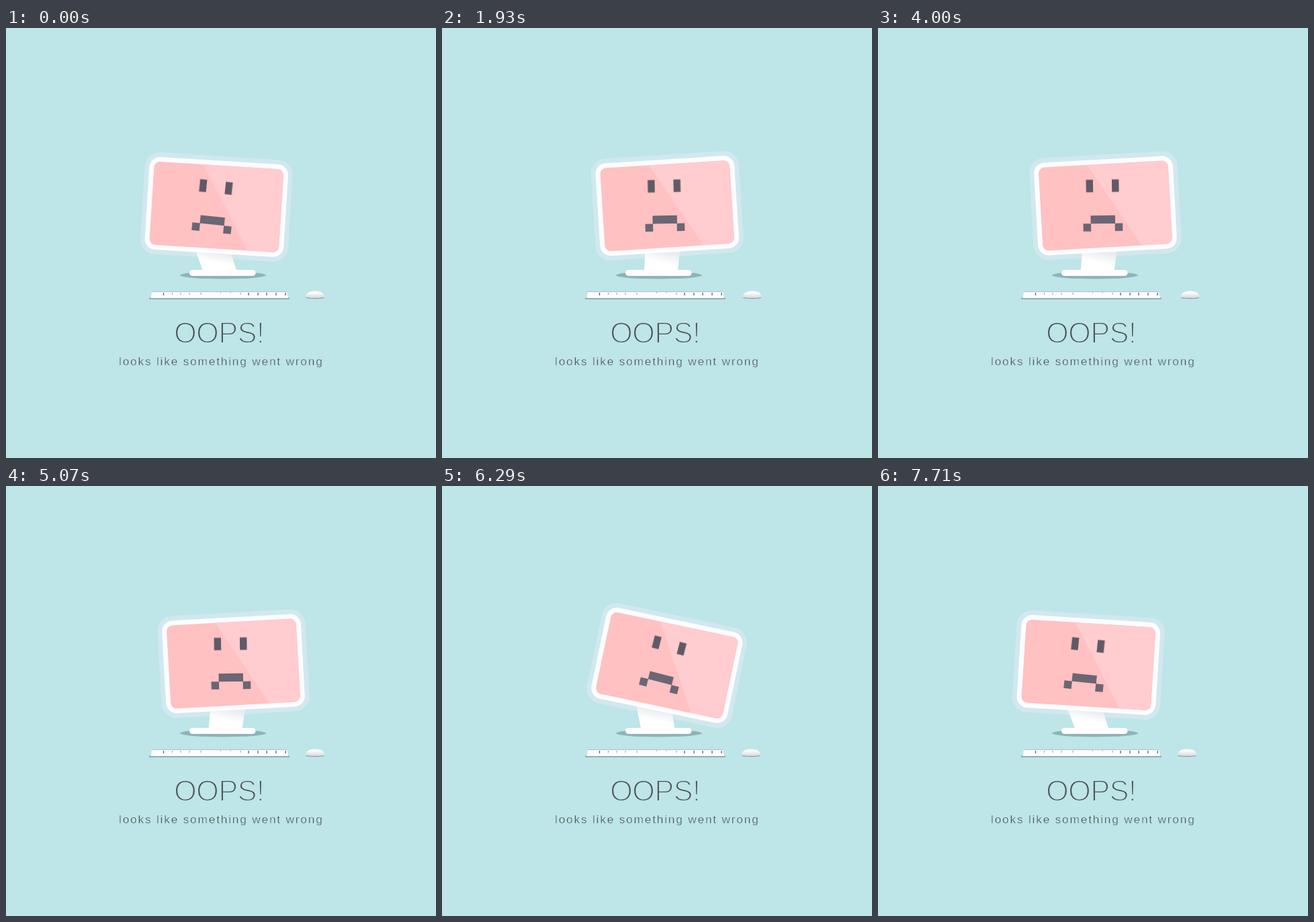
These frames come from a looping animation (640 px wide and 640 px high, 8070 ms). An HTML page:

```html
<!DOCTYPE html>
<html lang="en">
<head>
<meta charset="utf-8">
<title>Oops</title>
<style>
  /* --n: 0 = monitor on the left, 1 = on the right; --a: monitor tilt */
  @property --n { syntax: "<number>"; inherits: true; initial-value: 0; }
  @property --a { syntax: "<angle>"; inherits: true; initial-value: 3.6deg; }

  html, body { margin: 0; width: 100%; height: 100%; overflow: hidden; background: #bee5e7; }
  svg {
    display: block; width: 100vw; height: 100vh;
    animation: slide 8.07s infinite, tilt 8.07s infinite;
  }
  .head {
    transform: translate(calc(var(--n) * 33.1px), calc(var(--n) * -2px)) rotate(var(--a));
  }
  .neck {
    transform: translateX(calc(var(--n) * 8px)) skewX(calc(19.1deg - var(--n) * 25.7deg));
  }
  .mouse { animation: nudge 8.07s infinite; }
  .face { animation: face 8.07s step-end infinite; }
  .code { visibility: hidden; animation: code 8.07s step-end infinite; }
  .open { animation: open 8.07s step-end infinite; }
  .shut { opacity: 0; animation: shut 8.07s step-end infinite; }

  @keyframes slide {
    0%, 14.99% { --n: 0; animation-timing-function: ease-in; }
    19.58% { --n: .45; animation-timing-function: ease-out; }
    26.02%, 67.29% { --n: 1; animation-timing-function: ease-in; }
    74.35% { --n: .81; animation-timing-function: linear; }
    77.45% { --n: .45; animation-timing-function: ease-out; }
    81.41% { --n: -.02; animation-timing-function: ease-out; }
    87.98%, 100% { --n: 0; }
  }
  @keyframes tilt {
    0%, 14.99% { --a: 3.6deg; animation-timing-function: ease-in-out; }
    20.45% { --a: -8.1deg; animation-timing-function: ease-in-out; }
    23.92% { --a: -3.65deg; animation-timing-function: ease-out; }
    26.64% { --a: -3.2deg; animation-timing-function: ease-in-out; }
    35.44% { --a: -5deg; animation-timing-function: ease-in-out; }
    39.78% { --a: -4.9deg; animation-timing-function: ease-in-out; }
    45.97%, 67.29% { --a: -3.2deg; animation-timing-function: ease-in; }
    74.35% { --a: 2.4deg; animation-timing-function: cubic-bezier(.3, .3, .6, 1); }
    77.57% { --a: 12deg; animation-timing-function: cubic-bezier(.4, 0, .7, .7); }
    81.41% { --a: 6.5deg; animation-timing-function: ease-out; }
    87.98% { --a: 3.9deg; animation-timing-function: ease-out; }
    95.54%, 100% { --a: 3.6deg; }
  }
  @keyframes nudge {
    0%, 21.31% { transform: none; animation-timing-function: ease-in-out; }
    27.51%, 56.63% { transform: translateX(4.5px); animation-timing-function: ease-in-out; }
    62.83%, 100% { transform: none; }
  }
  @keyframes face {
    0%, 49.57% { visibility: visible; }
    32.71% { visibility: hidden; }
  }
  @keyframes code {
    0%, 49.57% { visibility: hidden; }
    32.71% { visibility: visible; }
  }
  @keyframes open {
    0%, 5.33%, 76.21% { opacity: 1; }
    2.6%, 73.48% { opacity: 0; }
  }
  @keyframes shut {
    0%, 5.33%, 76.21% { opacity: 0; }
    2.6%, 73.48% { opacity: 1; }
  }

  /* a stroke in the background colour thins the letters to a light weight */
  text { font-family: "Liberation Sans", Arial, sans-serif; fill: #4a5054; stroke: #bee5e7; }
  .title { font-size: 43.6px; letter-spacing: -.8px; stroke-width: 2px; }
  .sub { font-size: 17.3px; letter-spacing: 1.8px; stroke-width: .4px; }
</style>
</head>
<body>
<svg viewBox="0 0 640 640">
  <defs>
    <linearGradient id="shade" x1=".65" y1="0" x2=".35" y2="1">
      <stop offset=".25" stop-color="#eaecef"/>
      <stop offset=".65" stop-color="#fff"/>
    </linearGradient>
    <linearGradient id="dome" x1="0" y1="0" x2="0" y2="1">
      <stop offset=".3" stop-color="#fafafb"/>
      <stop offset="1" stop-color="#d3d6d9"/>
    </linearGradient>
    <clipPath id="glass"><rect x="-96.5" y="-62" width="193" height="124" rx="9"/></clipPath>
    <polygon id="lid" points="-4,-1 5.8,-1 4,1 -5.8,1"/>
    <rect id="eye" x="-5.2" y="-9.3" width="10.4" height="18.6"/>
    <path id="digits"/>
  </defs>

  <ellipse cx="323" cy="368" rx="64" ry="5.5" fill="#90b3b6"/>

  <g transform="translate(309.1 333.3)">
    <g class="head">
      <rect x="-110.3" y="-143" width="220.6" height="152" rx="22" fill="#d1e8ef"/>
    </g>
  </g>

  <g transform="translate(318.5 362)">
    <path class="neck" d="M-26-38H26L25 0H-25Z" fill="url(#shade)"/>
  </g>
  <rect x="273" y="360" width="98.5" height="9" rx="4.5" fill="#fdfdfe"/>

  <g transform="translate(309.1 333.3)">
    <g class="head">
      <g transform="translate(0 -67)">
        <rect x="-103.5" y="-69" width="207" height="138" rx="16" fill="#fdfdff"/>
        <g clip-path="url(#glass)">
          <rect x="-97" y="-63" width="194" height="126" fill="#ffc1c2"/>
          <path d="M-23.5-62H97V62H50Z" fill="#ffcccf"/>
        </g>
        <g class="face">
          <g transform="translate(-3.8 -4.7) rotate(2.4)">
            <g class="open" fill="#605a66">
              <use href="#eye" x="-19.2" y="-25"/>
              <use href="#eye" x="19.2" y="-25"/>
            </g>
            <g class="shut" fill="#605a66">
              <use href="#lid" transform="translate(-19.2 -24) rotate(-5)"/>
              <use href="#lid" transform="translate(19.2 -24) rotate(-5)"/>
            </g>
            <path d="M-18.2 19h36.4v12h-36.4ZM-29.3 31h11.5v11.5h-11.5ZM17.8 31h11.5v11.5H17.8Z" fill="#6b6674"/>
          </g>
        </g>
        <g class="code" transform="translate(-4.7 -1.4)">
          <use href="#digits" x="-3.5" y="3.5" fill="#fff"/>
          <use href="#digits" fill="#5f5963"/>
        </g>
      </g>
    </g>
  </g>

  <rect x="213" y="401.500" width="209" height="2.200" rx="1" fill="#8aa7ad"/>
  <path d="M217 392H418L420 402H215.500Z" fill="#fcfcfd"/>
  <path d="M217 392.500H418" stroke="#b9bcc2"/>
  <path d="M234.500 394v4M361 394v4M375 394v4M388 394v4M402 394v4M416 394v4" stroke="#5d6066" stroke-width="1.300"/>
  <path d="M247.500 394v3M260 394v3M273 394v3M290 394v3M349 394v3" stroke="#96999f"/>
  <path d="M319.500 393v2M334 393v2" stroke="#b5b8bd"/>

  <g class="mouse">
    <ellipse cx="460" cy="401.500" rx="13.500" ry="1.500" fill="#7f8f94"/>
    <path d="M446 400C446 394 453 391.500 460 391.500S474 394 474 400Q473 402 460 402T446 400Z" fill="url(#dome)"/>
  </g>

  <text class="title" x="250" y="468.500">OOPS!</text>
  <text class="sub" x="168" y="502">looks like something went wrong</text>
</svg>
<script>
  const four = ["...XX", "..XXX", ".X.XX", "X..XX", "XXXXX", "...XX", "...XX"];
  const zero = [".XXX.", "X...X", "X..XX", "X.X.X", "XX..X", "X...X", ".XXX."];
  const cell = 5, step = 34.5;

  const glyph = (rows, left) => rows.map((row, r) => [...row].map((c, i) =>
    c === "X" ? `M${left + i * cell} ${(r - 3.5) * cell}h5.1v5.1h-5.1Z` : "").join("")).join("");

  document.getElementById("digits").setAttribute("d",
    [four, zero, four].map((rows, i) => glyph(rows, (i - 1) * step - 2.5 * cell)).join(""));
</script>
</body>
</html>
```
